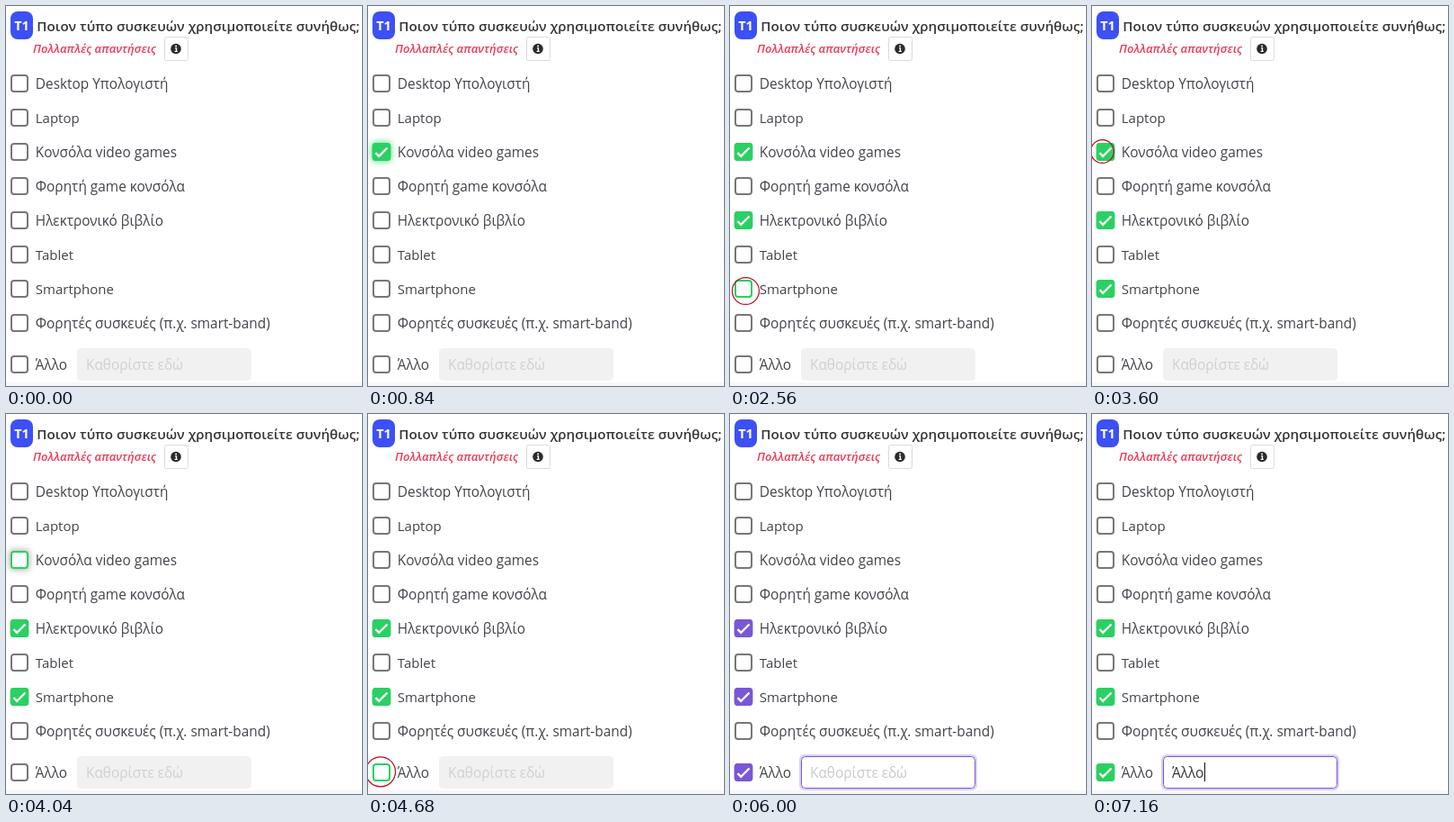
An HTML page for the animation above (7.2 s loop, 396 by 422 pixels).

```html
<!DOCTYPE html>
<html lang="el">
<head>
<meta charset="utf-8">
<title>Ερωτηματολόγιο</title>
<style>
html, body { margin: 0; width: 100%; height: 100%; overflow: hidden; background: #fff; }
svg { display: block; width: 396px; height: 422px; font-family: "Open Sans", "Noto Sans", sans-serif; }
text { white-space: pre; }
</style>
</head>
<body>
<svg id="stage" viewBox="0 0 396 422" xmlns="http://www.w3.org/2000/svg">
  <defs>
    <filter id="soft" x="-100%" y="-100%" width="300%" height="300%"><feGaussianBlur stdDeviation="3.6"/></filter>
  </defs>
  <rect width="396" height="422" fill="#fff"/>
  <rect y="418" width="396" height="4" fill="#f7f7f7"/>
  <rect x="5" y="6" width="25" height="31" rx="8" fill="#3c50f5"/>
  <text x="17.5" y="27" text-anchor="middle" font-size="14.5" font-weight="700" fill="#fff">T1</text>
  <text x="34.3" y="28" font-size="15.2" font-weight="600" fill="#363636">Ποιον τύπο συσκευών χρησιμοποιείτε συνήθως;</text>
  <text x="30" y="52" font-size="13" font-weight="600" font-style="italic" fill="#ee3a56">Πολλαπλές απαντήσεις</text>
  <rect x="176.5" y="34.5" width="26" height="26" rx="2" fill="#fff" stroke="#dbdbdb"/>
  <circle cx="189" cy="47.5" r="5.8" fill="#2b2b2b"/>
  <path d="M188 46.8h1.5v3.4M187.6 50.4h3.2" fill="none" stroke="#fff" stroke-width="1.3"/>
  <circle cx="189.1" cy="44.4" r="1" fill="#fff"/>
  <g id="rows"></g>
  <rect id="halo" x="78" y="379" width="196" height="38" rx="5" fill="none" stroke="#7957d5" stroke-opacity=".28" stroke-width="2"/>
  <rect id="field" x="79.5" y="380.5" width="193" height="35" rx="4"/>
  <text id="hint" x="89" y="404" font-size="15.4">Καθορίστε εδώ</text>
  <text id="typed" x="89" y="404" font-size="15.4" fill="#363636"></text>
  <rect id="caret" y="387" width="1.2" height="21" fill="#222"/>
  <circle id="ring" fill="none" stroke="#c4061c" stroke-width="1.2"/>
</svg>
<script>
const NS = "http://www.w3.org/2000/svg";
const LOOP = 7200, STEP = 40, HOLD = 140, RING = 240, FADE = 150;
const GREEN = "#2ad062", PURPLE = "#7957d5", GREY = "#777";
const OTHER = 8;
const labels = ["Desktop Υπολογιστή", "Laptop", "Κονσόλα video games", "Φορητή game κονσόλα",
  "Ηλεκτρονικό βιβλίο", "Tablet", "Smartphone", "Φορητές συσκευές (π.χ. smart-band)", "Άλλο"];
const rowY = i => i === OTHER ? 398 : 86 + 38 * i;

// Presses: time, pointer place, row toggled on release (-1 is the text field)
const presses = [
  { at: 480, x: 15, y: 162, row: 2 },
  { at: 1480, x: 15, y: 238, row: 4 },
  { at: 2480, x: 17.4, y: 316.5, row: 6 },
  { at: 3552, x: 11.5, y: 161.5, row: 2 },
  { at: 4576, x: 14, y: 397.3, row: OTHER },
  { at: 5096, x: 127, y: 398, row: -1 }
];
const focusAt = presses[5].at;
const keys = [6640, 6800, 6960, 7080];

const $ = id => document.getElementById(id);
const clamp = v => Math.max(0, Math.min(1, v));

function add(parent, tag, attrs) {
  const el = document.createElementNS(NS, tag);
  set(el, attrs);
  return parent.appendChild(el);
}
function set(el, attrs) {
  for (const k in attrs) el.setAttribute(k, attrs[k]);
}

const rows = labels.map((label, i) => {
  const g = add($("rows"), "g", { transform: `translate(0 ${rowY(i)})` });
  const glow = add(g, "rect", { x: 4, y: -11, width: 22, height: 22, rx: 4, filter: "url(#soft)" });
  const box = add(g, "rect", { x: 6, y: -9, width: 18, height: 18, rx: 3, fill: "#fff", "stroke-width": 2 });
  const fill = add(g, "rect", { x: 4.6, y: -10, width: 20.8, height: 20, rx: 4 });
  const tick = add(g, "path", { d: "M8.5 1.2L12.2 4.9L21.5 -4.5", fill: "none", stroke: "#fff", "stroke-width": 2.4 });
  const size = /[α-ω]/.test(label) ? 15.4 : 15;
  add(g, "text", { x: 32.8, y: 6, "font-size": size, fill: "#40444a" }).textContent = label;
  return { glow, box, fill, tick };
});

// Row under the unseen pointer
function hovered(t) {
  if (t < 240 || t >= 4900) return -1;
  let y = presses[0].y;
  for (let i = 1; i < 5; i++) {
    const p = presses[i], lead = 440;
    const k = clamp((t - p.at + lead) / (lead - 120));
    y += (p.y - y) * k * k * (3 - 2 * k);
  }
  return labels.findIndex((_, i) => Math.abs(rowY(i) - y) <= 12);
}

function drawRow(i, t, hover, accent) {
  const { glow, box, fill, tick } = rows[i];
  let on = false, amount = 0, glowing = 0;
  presses.forEach((p, n) => {
    const up = p.at + HOLD;
    if (p.row !== i || t < up) return;
    const k = clamp((t - up) / FADE);
    on = !on;
    amount = on ? k : 1 - k;
    const next = presses[n + 1];
    glowing = t < next.at ? 0.7 * k : 0;
  });
  set(glow, { opacity: glowing, fill: on ? accent : "#8a8a8a" });
  set(box, { stroke: on || hover === i ? accent : GREY });
  set(fill, { opacity: amount, fill: accent });
  set(tick, { opacity: amount });
}

function drawField(t) {
  const enabled = t >= presses[4].at + HOLD;
  const focused = t >= focusAt;
  const text = "Άλλο".slice(0, keys.filter(k => t >= k).length);
  set($("field"), {
    fill: enabled ? "#fff" : "#f1f1f1",
    stroke: focused ? PURPLE : enabled ? "#dbdbdb" : "#f1f1f1"
  });
  set($("halo"), { opacity: focused ? 1 : 0 });
  set($("hint"), { opacity: text ? 0 : 1, fill: enabled ? "#c9c9c9" : "#d0d0d0" });
  const typed = $("typed");
  typed.textContent = text;
  const blink = text || (t - focusAt) % 1000 < 500;
  set($("caret"), {
    x: 89 + (text ? typed.getComputedTextLength() + 0.5 : 0),
    opacity: focused && blink ? 1 : 0
  });
}

function drawRing(t) {
  const p = presses.find(p => t >= p.at && t < p.at + RING);
  const ring = $("ring");
  set(ring, { opacity: p ? 1 : 0 });
  if (p) set(ring, { cx: p.x, cy: p.y, r: 9.8 + 15.5 * (t - p.at) / RING });
}

function draw(ms) {
  const t = Math.floor((ms % LOOP) / STEP) * STEP;
  const accent = t >= focusAt && t < 6040 ? PURPLE : GREEN;
  const hover = hovered(t);
  rows.forEach((_, i) => drawRow(i, t, hover, accent));
  drawField(t);
  drawRing(t);
}

const start = performance.now();
function tick() {
  draw(performance.now() - start);
  requestAnimationFrame(tick);
}
tick();
</script>
</body>
</html>
```
